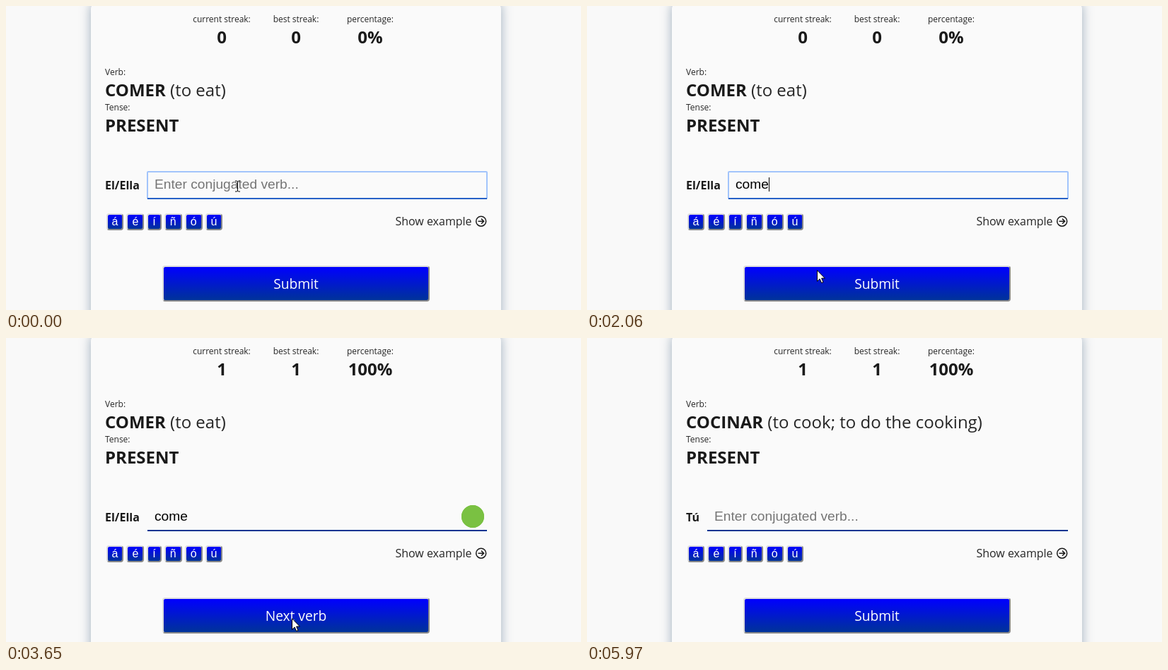
Recreate the animation shown at these times as an HTML page. Size 813 px wide and 431 px high, loop 6.87 s.

```html
<!DOCTYPE html>
<html lang="en">
<head>
<meta charset="utf-8">
<title>Verb practice</title>
<style>
  html, body { margin: 0; width: 100%; height: 100%; overflow: hidden; background: #f9f9f9; }
  #stage {
    position: fixed; left: 0; top: 0; width: 100%; height: 100%; overflow: hidden;
    font-family: "Open Sans", "Noto Sans", sans-serif; color: #262626; white-space: pre;
  }
  #stage > * { position: absolute; box-sizing: border-box; }
  .card {
    left: 120px; top: -4px; width: 580px; height: 470px; border-radius: 8px;
    background: #fafafa; box-shadow: 0 0 15px rgba(70, 100, 130, .5);
  }
  .key, #button {
    border: 2px outset #ddd; border-radius: 4px; text-align: center;
    color: #fff; background: linear-gradient(#00f, #039);
  }
  .key { top: 294px; height: 24px; padding-top: 1px; font-size: 16px; line-height: 17px; }
  #button {
    left: 221px; top: 368px; width: 378px; height: 51px; padding-top: 10px;
    font-size: 19.2px; line-height: 27px;
  }
  .small { font-size: 12px; line-height: 17px; }
  .mid { font-size: 16px; line-height: 22px; }
  .big { font-size: 24px; line-height: 33px; }
  .bold, b { font-weight: 700; color: #1a1a1a; }
  .stat { width: 120px; text-align: center; }
  .small.stat { top: 10px; }
  .big.stat { top: 27px; }
  .row { left: 140px; }
  .arial { font-family: "Liberation Sans", Arial, sans-serif; }
  #field { top: 242px; font-size: 19.2px; line-height: 21px; }
  svg { left: 0; top: 0; }
</style>
</head>
<body>
<div id="stage">
  <div class="card"></div>
  <div class="small stat" style="left:245px">current streak:</div>
  <div class="small stat" style="left:350px">best streak:</div>
  <div class="small stat" style="left:455px">percentage:</div>
  <div class="big bold stat" style="left:245px" id="streak"></div>
  <div class="big bold stat" style="left:350px" id="best"></div>
  <div class="big bold stat" style="left:455px" id="percent"></div>

  <div class="small row" style="top:85px">Verb:</div>
  <div class="big row" style="top:102px"><b id="verb"></b><span id="meaning"></span></div>
  <div class="small row" style="top:135px">Tense:</div>
  <div class="big bold row" style="top:152px">PRESENT</div>

  <div class="mid bold row" style="top:243px" id="person"></div>
  <div class="arial" id="field"></div>
  <div class="mid" style="left:550.4px; top:294px">Show example</div>
  <div id="button"></div>

  <svg id="art" width="813" height="431" viewBox="0 0 813 431">
    <rect id="line" y="272" height="2" fill="#003391"/>
    <rect id="ring" x="200" y="235" width="480" height="38" rx="1" fill="none"
          stroke="#4d90fe" stroke-opacity=".5" stroke-width="2"/>
    <rect id="caret" y="243" width="1" height="20"/>

    <g id="check" fill="none">
      <circle id="fill" cx="26" cy="26" stroke="#7ac142"/>
      <circle id="circle" cx="26" cy="26" r="25" stroke="#7ac142" stroke-width="2" stroke-dasharray="166"/>
      <path id="tick" d="M14.1 27.2l7.1 7.2 16.7-16.8" stroke="#fff" stroke-width="2" stroke-dasharray="48"/>
    </g>

    <g fill="none" stroke="#1a1a1a" stroke-width="1.5">
      <circle cx="671.7" cy="305.2" r="7"/>
      <path d="M667.5 305.2h7.8M672 301.6l3.6 3.6-3.6 3.6"/>
    </g>

    <path id="beam" d="M-3.5-7.5H-1L0-6.5 1-7.5H3.5M0-6.5V6.5M-3.5 7.5H-1L0 6.5 1 7.5H3.5" fill="none" stroke="#000"/>
    <path id="arrow" d="M.5.8V16.3L4.1 12.9 6.6 18.5 9 17.5 6.6 12H11.4Z" fill="#fff" stroke="#000"/>
  </svg>
</div>
<script>
const LOOP = 6870, CHECK_START = 2975;
const $ = id => document.getElementById(id);

// accent keys
let keyX = 141.55;
for (const ch of "áéíñóú") {
  const w = ch === "í" ? 20.45 : 24.9;
  const key = document.createElement("div");
  key.className = "key arial";
  key.style.left = keyX + "px";
  key.style.width = w + "px";
  key.textContent = ch;
  $("stage").insertBefore(key, $("art"));
  keyX += w + 4;
}

// each step changes part of the state and holds until the next
const steps = [
  [0, { typed: "", caret: false, focus: true, beam: [327.5, 255.5], arrow: null,
        score: ["0", "0", "0%"], verb: ["COMER", " (to eat)"], person: "El/Ella",
        left: 200, label: "Submit", pressed: false, check: false }],
  [460, { typed: "c", caret: true }],
  [590, { typed: "co" }],
  [740, { typed: "com" }],
  [880, { typed: "come" }],
  [1470, { caret: false }],
  [1750, { beam: [325.5, 263.5] }],
  [1900, { caret: true, beam: null, arrow: [314, 298] }],
  [2060, { arrow: [325, 374] }],
  [2210, { arrow: [357, 411] }],
  [2360, { caret: false, arrow: [394, 404] }],
  [2510, { arrow: [404, 397] }],
  [2930, { focus: false, pressed: true }],
  [3080, { pressed: false, score: ["1", "1", "100%"], label: "Next verb", check: true }],
  ...[3220, 3350, 3500, 3650, 3780, 3930, 4080, 4230].map(t => [t, {}]),
  [5410, { label: "Submit" }],
  [5690, { check: false, typed: "", person: "Tú", left: 170,
           verb: ["COCINAR", " (to cook; to do the cooking)"] }],
  [5820, { arrow: [403, 406] }],
  [5970, { arrow: null }]
];

const clamp = v => Math.min(1, Math.max(0, v));

// cubic-bezier(x1, 0, x2, 1)
function ease(p, x1, x2) {
  p = clamp(p);
  let lo = 0, hi = 1;
  for (let i = 0; i < 24; i++) {
    const u = (lo + hi) / 2, v = 1 - u;
    if (3 * u * v * v * x1 + 3 * u * u * v * x2 + u ** 3 < p) lo = u; else hi = u;
  }
  return lo * lo * (3 - 2 * lo);
}
const inOut = p => ease(p, .42, .58);
const draw = p => ease(p, .65, .45);

const set = (id, attrs) => {
  for (const k in attrs) $(id).setAttribute(k, attrs[k]);
};
const show = (id, on) => { $(id).style.display = on ? "" : "none"; };
const write = (id, s) => { $(id).textContent = s; };

function pointer(id, pos) {
  show(id, pos);
  if (pos) set(id, { transform: `translate(${pos})` });
}

function drawCheck(ms) {
  const pulse = clamp((ms - 900) / 300);
  const scale = 32 / 52 * (1 + .1 * inOut(1 - Math.abs(2 * pulse - 1)));
  const w = Math.min(26, 30 * 52 / 32 * inOut((ms - 400) / 400));
  set("check", { transform: `translate(660 253) scale(${scale}) translate(-26 -26)` });
  set("fill", { r: 26 - w / 2, "stroke-width": w });
  set("circle", { "stroke-dashoffset": 166 * (1 - draw(ms / 600)) });
  set("tick", { "stroke-dashoffset": 48 * (1 - draw((ms - 800) / 300)) });
  show("tick", ms > 800);
}

function render(state, time) {
  ["streak", "best", "percent"].forEach((id, i) => write(id, state.score[i]));
  write("verb", state.verb[0]);
  write("meaning", state.verb[1]);
  write("person", state.person);
  write("button", state.label);

  const x = state.left + 10, field = $("field");
  write("field", state.typed || "Enter conjugated verb...");
  field.style.left = x + "px";
  field.style.color = state.typed ? "#000" : "#757575";
  set("line", { x: state.left, width: 680 - state.left });
  show("ring", state.focus);
  show("caret", state.caret);
  set("caret", { x: Math.round(x + field.getBoundingClientRect().width) });

  $("button").style.borderStyle = state.pressed ? "inset" : "outset";
  pointer("beam", state.beam);
  pointer("arrow", state.arrow);
  show("check", state.check);
  if (state.check) drawCheck(time - CHECK_START);
}

let shown = -1;
function tick() {
  const now = performance.now() % LOOP;
  const index = steps.findLastIndex(([t]) => t <= now);
  if (index !== shown) {
    shown = index;
    const state = Object.assign({}, ...steps.slice(0, index + 1).map(s => s[1]));
    render(state, steps[index][0]);
  }
  requestAnimationFrame(tick);
}
tick();
</script>
</body>
</html>
```
